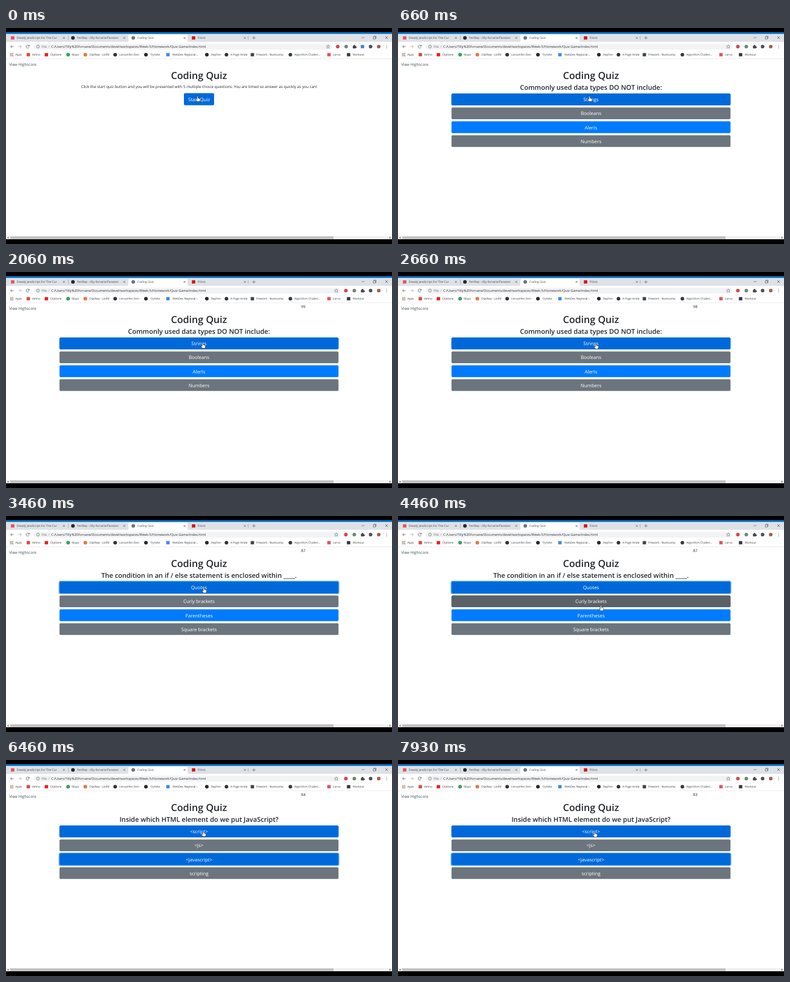
Recreate the animation shown at these times as an HTML page. Size 640 by 360 pixels, loop 8000 ms.

```html
<!DOCTYPE html>
<html lang="en">
<head>
<meta charset="utf-8">
<title>Coding Quiz</title>
<style>
  html, body { margin: 0; width: 100%; height: 100%; overflow: hidden; background: #000; }
  svg { display: block; width: 100vw; height: 100vh; font-family: "Open Sans", "Noto Sans", sans-serif; text-rendering: geometricPrecision; }
  .mid { text-anchor: middle; }
  .line { fill: none; stroke: #5f6368; stroke-width: .8; }
  .tab { font-size: 4.9px; fill: #45494d; }
  .mark { font-size: 4.75px; fill: #3c4043; }
  .url { font-size: 5.53px; fill: #303236; }
  .body { font-size: 6.35px; fill: #212529; }
  .h1 { font-size: 16.1px; font-weight: 600; fill: #212529; }
  .h2 { font-size: 11.05px; font-weight: 600; fill: #212529; }
  .label { font-size: 7.9px; fill: #fff; }
</style>
</head>
<body>
<svg id="stage" viewBox="0 0 640 360"></svg>
<script>
const DURATION = 8000;
const stage = document.getElementById('stage');

const rect = (x, y, w, h, fill, extra = '') =>
  `<rect x="${x}" y="${y}" width="${w}" height="${h}" fill="${fill}" ${extra}/>`;
const dot = (x, y, r, fill) => `<circle cx="${x}" cy="${y}" r="${r}" fill="${fill}"/>`;
const line = (d, extra = '') => `<path class="line" d="${d}" ${extra}/>`;
const text = (x, y, cls, str = '', id = '') =>
  `<text x="${x}" y="${y}" class="${cls}" id="${id}">${str}</text>`;
const cross = (x, y, r) => line(`M${x - r} ${y - r}l${2 * r} ${2 * r}m0 ${-2 * r}l${-2 * r} ${2 * r}`);
const square = (x, y, fill) => rect(x - 2.8, y - 2.8, 5.6, 5.6, fill, 'rx=".6"');
const round = (x, y, fill) => dot(x, y, 3, fill);

// Browser window
const tabs = [
  [11, square, '#e5525b', 'Steady JavaScript For The Cur'],
  [111, round, '#24292e', 'FenRep - tilly-forvane/Passwor'],
  [211, round, '#6b7580', 'Coding Quiz'],
  [311, square, '#d5131b', 'Filvist']
];

const bookmarks = [
  [37, 43, square, '#dc4a3d', 'Velmo'],
  [67, 73, square, '#f01c1c', 'ClipVane'],
  [103, 109, round, '#35a05a', 'Maps'],
  [131.5, 138, round, '#e8743b', 'OakRep - UofM'],
  [181, 188, round, '#303236', 'Lessonfen Den'],
  [232, 239, round, '#25272a', 'TryVole'],
  [268.5, 276, square, '#4285f4', 'WebDev Regional...'],
  [333, 340, round, '#24292e', 'RepFen'],
  [365.5, 372, round, '#303236', 'A Page Aside'],
  [408.5, 415, square, '#42464b', 'Prework - Bootcamp'],
  [471.5, 478, round, '#36393d', 'Algorithm Challen...'],
  [535.5, 542, square, '#e5525b', 'Lorvo'],
  [568, 575, square, '#36393d', 'Workout']
];

function appsIcon() {
  const colors = ['#e5493c', '#f2a92c', '#3b9c58', '#4285f4'];
  return Array.from({ length: 9 }, (_, i) =>
    rect(6.8 + i % 3 * 2, 41.8 + Math.floor(i / 3) * 2, 1.4, 1.4, colors[i % 4])).join('');
}

const star = 'M0-3L.9-1 3-.8 1.4.6 1.9 2.7 0 1.6-1.9 2.7-1.4.6-3-.8-.9-1Z';
const puzzle = 'M-2.5-1.4h1.5a1.2 1.2 0 1 1 2.2 0h1.3v1.5a1.1 1.1 0 1 1 0 2v.9h-5z';

const chrome =
  rect(0, 7, 640, 3.2, '#0b78cc') +
  rect(0, 10, 640, 14, '#dee1e6') +
  rect(0, 23, 640, 29, '#fff') +
  '<path d="M200 23.5q3 0 3-3v-7q0-2.5 2.5-2.5h93q2.5 0 2.5 2.5v7q0 3 3 3z" fill="#fff"/>' +
  line('M103.5 13v7M401.5 13v7', 'style="stroke:#92969b;stroke-width:.6"') +
  tabs.map(([x, icon, fill, name]) =>
    icon(x, 16.5, fill) + text(x + 6.8, 18.3, 'tab', name) + cross(x + 85, 16.5, 1.5)).join('') +
  line('M408.2 16.5h5.6M411 13.7v5.6M589.5 16h5M609 14.7h3.6v3.6H609zM610 14.7v-1h3.6v3.6h-1', 'style="stroke-width:.7"') +
  cross(631, 16, 2) +
  line('M12.8 31H7.5m2.4-2.4L7.5 31l2.4 2.4') +
  line('M20.2 31h5.3m-2.4-2.4 2.4 2.4-2.4 2.4', 'style="stroke:#a5a9ae"') +
  line('M38.4 30a2.6 2.6 0 1 0 0 2m.3-4v2.2h-2.2') +
  rect(46, 26.3, 495, 9.6, '#f1f3f4', 'rx="4.8" id="omnibox"') +
  line('M55.5 31a2.5 2.5 0 1 0-5 0 2.5 2.5 0 1 0 5 0M53 30.7v1.7M53 29.3v.7', 'style="stroke-width:.6"') +
  text(59, 32.9, 'url', 'File').replace('class', 'style="fill:#6b7075" class') +
  line('M71.2 28.5v5', 'style="stroke:#aaadb1;stroke-width:.6"') +
  text(75, 32.9, 'url', 'C:/Users/Tilly%20Forvane/Documents/devel/workspaces/Week-5/Homework/Quiz-Game/index.html') +
  '<g id="tools">' +
    line(star, 'transform="translate(547.5 31)" style="stroke-width:.6"') +
    round(563.5, 31, '#d8434c') + round(577.5, 31, '#6c8a72') +
    `<path d="${puzzle}" transform="translate(591 31)" fill="#45494d"/>` +
  '</g>' +
  `<g id="popped">${square(591, 31, '#3e82dd')}</g>` +
  round(604.5, 31, '#4d5358') + round(618, 31, '#a35d50') +
  [28.8, 31, 33.2].map(y => dot(631, y, .6, '#5f6368')).join('') +
  appsIcon() + text(15.5, 46.3, 'mark', 'Apps') +
  bookmarks.map(([x, tx, icon, fill, name]) => icon(x, 44.5, fill) + text(tx, 46.3, 'mark', name)).join('') +
  rect(0, 51.3, 640, .6, '#dcdfe3');

// Page
const button = (id, x, y, w, h, base, dark) =>
  `<g id="${id}">` +
  rect(x - .7, y - .7, w + 1.4, h + 1.4, 'none', 'rx="2.4" stroke="#007bff" stroke-opacity=".5" stroke-width="1.5" class="ring" opacity="0"') +
  rect(x, y, w, h, base, 'rx="2"') +
  rect(x, y, w, h, dark, 'rx="2" class="dark"') +
  text(x + w / 2, y + 12.9, 'label mid') + '</g>';

const rows = [0, 1, 2, 3].map(i => i % 2
  ? button('row' + i, 88.7, 109.3 + 23.15 * i, 462.6, 19.6, '#6c757d', '#5a6268')
  : button('row' + i, 88.7, 109.3 + 23.15 * i, 462.6, 19.6, '#007bff', '#0069d9')).join('');

const page =
  rect(0, 51.9, 640, 300.3, '#fff') +
  text(5.3, 63.3, 'body', 'View Highscore').replace('class', 'style="fill:#3b4a50" class') +
  text(493, 60.3, 'body mid', '', 'timer') +
  text(320, 85, 'h1 mid', 'Coding Quiz') +
  '<g id="intro">' +
    text(320, 99.6, 'body mid', 'Click the start quiz button and you will be presented with 5 multiple choice questions. You are timed so answer as quickly as you can!') +
    button('start', 295, 108.8, 50, 19.6, '#007bff', '#0069d9') +
  '</g><g id="quiz">' + text(320, 103.3, 'h2 mid', '', 'question') + rows + '</g>' +
  rect(0, 346.8, 640, 5.4, '#f1f1f1') + rect(7, 347.3, 536, 4.4, '#c1c1c1') +
  '<path d="M4.2 347.9v3.2L2.2 349.5zM635.8 347.9v3.2l2-1.6z" fill="#505050"/>' +
  rect(0, 352.2, 640, 7.8, '#000');

const hand = '<path id="hand" d="M-.9.7Q0-.6.9.7V3.3L4 4.1Q4.8 4.4 4.6 5.4L3.9 9H-.6L-2.8 5.8Q-2.9 4.6-1.7 5L-.9 5.7Z" fill="#fff" stroke="#222" stroke-width=".6"/>';

stage.innerHTML = rect(0, 0, 640, 360, '#000') + chrome + page + hand;

// Timeline
const questions = [
  [330, 'Commonly used data types DO NOT include:', ['Strings', 'Booleans', 'Alerts', 'Numbers']],
  [2860, 'The condition in an if / else statement is enclosed within ____.', ['Quotes', 'Curly brackets', 'Parentheses', 'Square brackets']],
  [5360, 'Inside which HTML element do we put JavaScript?', ['<script>', '<js>', '<javascript>', 'scripting']]
];
const timer = [[0, ''], [1460, 99], [2460, 98], [2860, 88], [3460, 87], [4530, 86], [5500, 85], [6460, 84], [7460, 83]];
const cursor = [[0, 317.4, 113.6], [1330, 317.4, 113.6], [2130, 327, 118.6], [2660, 328, 119.2], [4130, 328, 119.2],
  [4460, 336.4, 149], [4800, 340, 164.8], [5800, 340, 164.8], [6260, 327, 118.6], [7460, 327, 118.6], [7660, 326, 119.4]];
const dark = [
  [[0, 1], [5190, 1], [5340, 0], [6130, 0], [6260, 1]],
  [[4290, 0], [4420, 1], [4500, 1], [4640, 0], [5900, 0], [5990, .8], [6120, 0]],
  [[4580, 0], [4720, 1]],
  [[0, 0]]
];
const ring = [
  [[2730, 0], [2880, 1], [5190, 1], [5340, 0]],
  [[0, 0]],
  [[5250, 0], [5400, 1]],
  [[0, 0]]
];
const startRing = [[60, 0], [210, 1]];

const $ = id => document.getElementById(id);
const latest = (steps, t) => steps.filter(s => s[0] <= t).pop();

function track(points, t, k = 1) {
  const next = points.findIndex(p => p[0] > t);
  if (next === 0) return points[0][k];
  if (next < 0) return points[points.length - 1][k];
  const a = points[next - 1], b = points[next];
  return a[k] + (b[k] - a[k]) * (t - a[0]) / (b[0] - a[0]);
}

function paintButton(el, darkness, glow, label) {
  el.querySelector('.dark').setAttribute('opacity', darkness);
  el.querySelector('.ring').setAttribute('opacity', glow);
  el.querySelector('text').textContent = label;
}

function draw(t) {
  const current = latest(questions, t);
  const started = Boolean(current);
  $('intro').style.display = started ? 'none' : '';
  $('quiz').style.display = started ? '' : 'none';
  $('popped').style.display = started ? 'none' : '';
  $('tools').setAttribute('transform', `translate(${started ? 0 : -13.5} 0)`);
  $('omnibox').setAttribute('width', started ? 508 : 494.5);
  $('timer').textContent = latest(timer, t)[1];
  paintButton($('start'), 1, track(startRing, t), 'Start Quiz');
  if (started) {
    $('question').textContent = current[1];
    current[2].forEach((label, i) => paintButton($('row' + i), track(dark[i], t), track(ring[i], t), label));
  }
  $('hand').setAttribute('transform', `translate(${track(cursor, t, 1)} ${track(cursor, t, 2)})`);
}

const begin = performance.now();
function frame() {
  draw((performance.now() - begin) % DURATION);
  requestAnimationFrame(frame);
}
frame();
</script>
</body>
</html>
```
